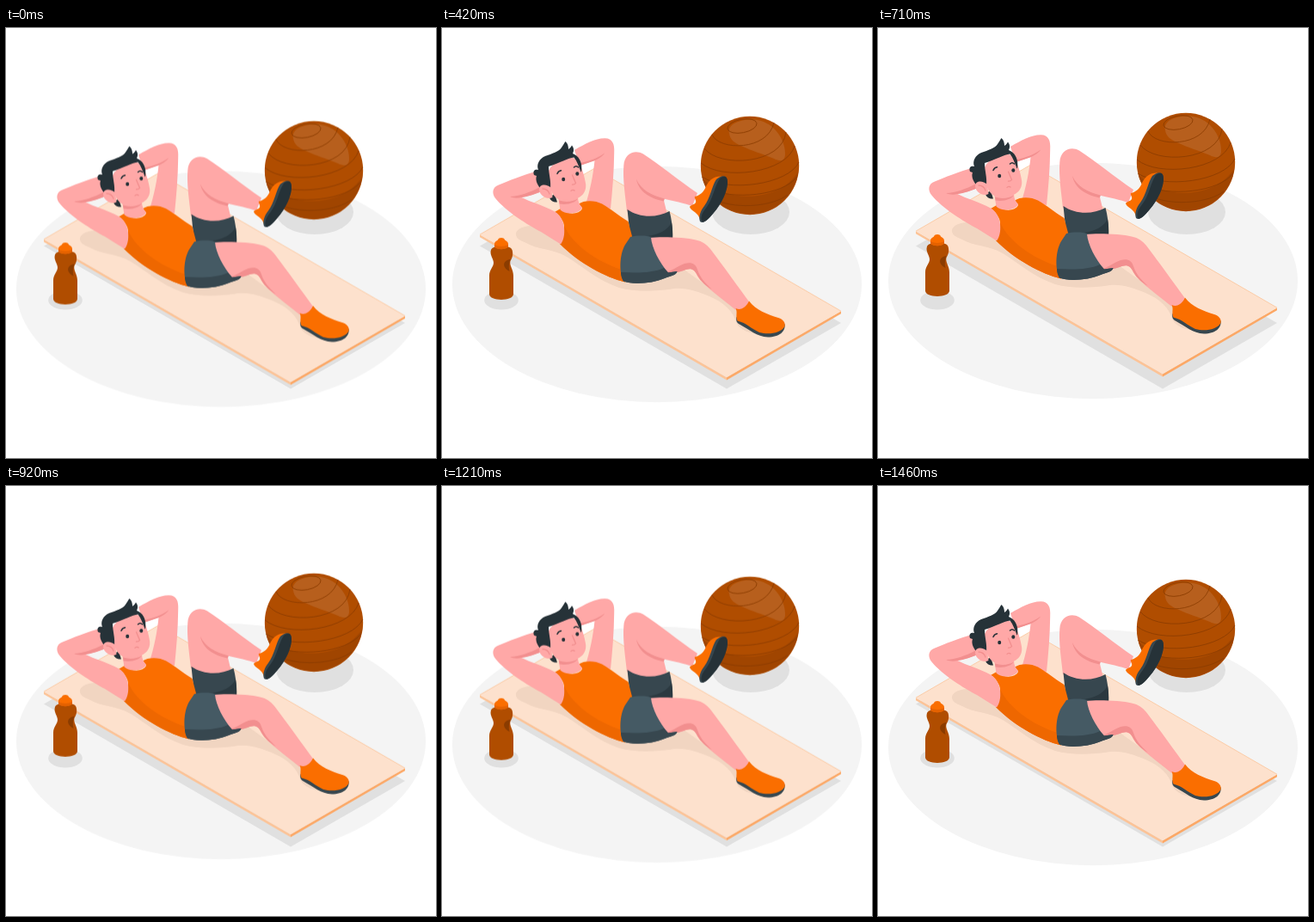
Write an HTML page that moves like this. It is 500x500 px and loops after 1.5 s.

```html
<!DOCTYPE html>
<html lang="en">
<head>
<meta charset="utf-8">
<title>Workout</title>
<style>
  html, body { margin: 0; width: 100%; height: 100%; overflow: hidden; background: #fff; }
  svg { display: block; width: 100%; height: 100%; }
  .skin { fill: #ffa8a7; }
  .blush { fill: #f28f8f; }
  .hair { fill: #263238; }
  .slate { fill: #455a64; }
  .deep { fill: #37474f; }
  .orange { fill: #fa6e00; }
  .rust { fill: #b04d00; }
  .shade { fill: #e0e0e0; }
  .seam { fill: none; stroke: #8a3c00; stroke-width: .8; }
  .line { fill: none; stroke: #f28f8f; stroke-width: 1.3; stroke-linecap: round; }
  .brow { fill: none; stroke: #263238; stroke-width: 1.5; stroke-linecap: round; }
</style>
</head>
<body>
<svg viewBox="0 0 500 500">
  <g class="float"><ellipse cx="250" cy="304" rx="238" ry="137.2" fill="#f4f4f4"/></g>

  <g class="shade">
    <path d="M44 253.500L331 419.500L464 343L177 177Z"/>
    <ellipse cx="359" cy="214" rx="45" ry="26"/>
    <ellipse cx="69" cy="316.500" rx="19.800" ry="11"/>
  </g>

  <g class="float">
    <!-- mat -->
    <path d="M44 246.200L331 412.200V415.400L44 249.200Z" fill="#fcc397"/>
    <path d="M331 412.200L464 335.200V338.200L331 415.400Z" fill="#fca866"/>
    <path d="M44 246.200L177 169.400L464 335.200L331 412.200Z" fill="#fde1cd"/>
    <path d="M44 246.200L177 169.400L464 335.200" fill="none" stroke="#fcc397" stroke-width=".8"/>
    <path d="M86 246C86 237 103 234 122 236L215 255L280 286C300 300 325 318 343 332L370 362C358 361 348 358 343 350C339 336 328 325 312 318.500C296 312 285 308 270 309C247 312.500 224 313 206 308C180 299 163 283 145 272C128 262 111 264 98 256C90 253 86 250 86 246Z" fill="#f1d5c1"/>

    <!-- ball -->
    <g>
      <circle class="rust" cx="358" cy="166" r="57.200"/>
      <path d="M302.500 180C330 213 395 207 414.500 173A57.200 57.200 0 0 1 302.500 180Z" fill="#a04500"/>
      <path d="M334 129C331 117 349 111 367 113C388 117 400 138 399 154C398 162 392 161 386 158C372 152 360 149 350 144C340 140 335 136 334 129Z" fill="#b75f1d"/>
      <g class="seam">
        <ellipse cx="349" cy="120" rx="17.300" ry="7.800" transform="rotate(-11 349 120)"/>
        <path d="M314 130C322 149 379 149 386 116"/>
        <path d="M305 146C322 169 396 165 400 127"/>
        <path d="M301 163C326 184 401 175 410 143"/>
        <path d="M302 179C332 198 403 188 415 162"/>
        <path d="M307 192C338 207 396 201 413 179"/>
        <path d="M320 207C346 217 385 213 402 200"/>
      </g>
    </g>

    <!-- bottle -->
    <g>
      <path class="rust" d="M57 264C59 258 80 258 81.500 264C83 269 82 273 79.500 277C78 282 83 287 83 294V315.500C83 324 55 324 55 315.500V294C55 287 60 284 60 279C60 274 55 270 57 264Z"/>
      <path d="M79.500 275C71 276 69 284 78.500 289C77 284 78 280 79.500 275Z" fill="#8a3c00"/>
      <path class="orange" d="M61 257.500C61 254.500 63 254 65 252.500C66 249.300 72 249.300 73 252.500C75 254 77 254.500 77 257.500V260.500C74 264 64 264 61 260.500Z"/>
      <path d="M61 258C65 260.500 73 260.500 77 258V260.500C74 264 64 264 61 260.500Z" fill="#e56200"/>
    </g>

    <!-- far arm -->
    <path class="skin" d="M154 148C166 141 178 134.500 189 134.300C198 134 201 141 200.200 151C200 174 198 196 196 216L167 211C172 196 176 176 177.500 160L160 166Z"/>
    <path class="blush" d="M161 163C172 160.500 182 157 189 151.500C187 155.500 181 158.700 177.500 160.200L160.500 166Z"/>

    <!-- raised leg -->
    <path class="skin" d="M215 219C213 200 210 182 211.300 166C212 152 224 147 234 152.500C252 164 276 184 297 198L291 213C283 210 268 207 257.500 204.500C259 211 261 218 262 225C250 231 228 228 215 219Z"/>
    <path class="blush" d="M226 182C231 194 244 201 259 204.500L257.800 207.500C242 204 229 197 226 182Z"/>
    <path class="orange" d="M288 214C290 211 293 212 295 209C296 206 293 204 294 202C300 201 305 196 307 190C311 182 317 178 325 178.500L303 231C299 230 300 226 297 223C294 219 289 218 288 214Z"/>
    <path class="deep" d="M319 182C326 176 332 177 332 186C331 200 322 215 312 225.500C308 230 303 234 300 231C298 225 301 218 305 213C312 204 314 189 319 182Z"/>
    <path class="hair" d="M323 181C329 177 332.300 178 332 187C331 200 322 215 312 225.500C308 230 304 233 302 230.500C300 225 304 219 308 214C315 205 317 190 323 181Z"/>
    <path class="deep" d="M215.500 217C229 226.500 249 227.500 264.500 219C267 228 268.500 240 268 251H219Z"/>
    <path d="M267 232C263 241 252 246 240 248L262 252L268.200 251C268.500 244 268 238 267 232Z" fill="#2b3940"/>

    <!-- torso -->
    <path class="orange" d="M131 220L138 216C145 224 160 223 163 216C162 213 160 212 159 210.500C165 206 178 206 186 210.500C196 216 206 225 216.500 231L222 252L213 301.500C190 296 160 280 137 257C142 250 144 236 140 230C137 224 134 222 131 220Z"/>
    <path d="M142.500 237C152 258 180 278 209 287L213 301.500C190 296 160 280 137 257C141 251 142.500 244 142.500 237Z" fill="#ee6700"/>

    <!-- near leg -->
    <path class="skin" d="M242 250C255 248.500 283 249.500 295 252.500C303 254 308 258 312 263C328 284 345 308 357.500 325C354 331 347 335 341 333.500C325 320 305 307 297 294C293 285 288 285 281 288C275 290 266 292 261 292C250 283 238 262 242 250Z"/>
    <path class="blush" d="M259 291C268 288 272 284 282 280C290 278 295 280 297 287C300 296 305 302 314 310C307 306 301 301 297 294C293 285 288 285 281 288C275 290 266 292 259 291Z"/>
    <path class="slate" d="M219 249C228 247 238 247 243 249.500C244 262 253 279 263 290.500L273.500 289C272 294 266 294 259 297C245 303 222 305 211 300.500C206 291 206 270 213 258Z"/>
    <path class="deep" d="M208 290C226 291 246 291 258 285L263 290.500L273.500 289C272 294 266 294 259 297C245 303 222 305 211 300.500C209 297 208 294 208 290Z"/>
    <path class="deep" d="M342.500 342C352 346 360 355 369 358C380 361 394 358 398.500 350C400 359 392 365.500 379 365.500C366 365 358 357 345 350C342 348 342 345 342.500 342Z"/>
    <path class="orange" d="M341.500 332C348 335 354 330 357 323.500C365 334 378 339 391 343C397 345 399.500 349 398.500 353C394 361 380 363 369 360C360 356 354 349 343.500 346.500C341 341 344 337 341.500 332Z"/>

    <!-- near arm -->
    <path class="skin" d="M112 172C94 177 77 184 66 188.500C58 191 58 199 62 204C75 220 100 235 115 243C123 248 131 253 138 257.500C145 249 144 227 131 219.500C117 212 102 208 92.500 203C102 201 112 198 118 195L114 176Z"/>
    <path class="blush" d="M79 202C90 201.500 103 197 113 191.500L117 195.500C109 199 100 202 92.500 203C88 204 83 204 79 202Z"/>

    <!-- head -->
    <path class="skin" d="M135 202L137.500 217.500C144 224 160 222 163 215C160 212 158 208 158 203Z"/>
    <path class="blush" d="M136 206.500C144 209 152 208 158 204.500C155 209 147 212 136.700 210.500Z"/>
    <path class="hair" d="M125 203L131 199L134 208.500C130 209 126 207 125 203Z"/>
    <path class="skin" d="M124 172C128 162 148 153 158 159C162 166 166 179 167.200 188C168 197 162 203 155 205C147 207.500 138 208 132 203C125 196 122 182 124 172Z"/>
    <path class="hair" d="M107 177C105 171 109 170 112 171C109.500 165 113 158 120 155C128 152 136 150 139 145C141 142 142 140 143.500 138C146 140 147 143 147 147C149 146 150 144 151 142.500C153 145 154 148 152 152C159 155 162.500 161 162.300 169C162.500 173 161.500 175 161 172C159 167 157 161 153.500 156.500C147 157 137 163 124 167C124 176 127 183 126 193L114 192C110 187 108.500 182 110 178Z"/>
    <path class="skin" d="M127 192C122 187 113 187 113 194C113.500 201 122 206 128.500 203Z"/>
    <path class="line" d="M117 193C121 193 124 196 125 199"/>
    <ellipse class="hair" cx="141.200" cy="182" rx="2" ry="2.300"/>
    <ellipse class="hair" cx="157.300" cy="175.500" rx="2" ry="2.300"/>
    <path class="brow" d="M134 175.500C135 173 137 172 138.500 171.800M153.500 168C155 166.500 157 166.500 158.500 168"/>
    <path class="line" d="M151.500 177L155.500 186.500C154.500 188 153 188.300 151.500 188.200M150 195.500C151 194 153 194 154 195"/>
  </g>
</svg>
<script>
  const LOOP = 1500, LEAD = 46, RISE = 10;
  const hold = 'steps(18, end)';
  const bob = [0, -RISE, 0].map(y => ({ transform: `translateY(${y}px)`, easing: hold }));
  for (const part of document.querySelectorAll('.float')) {
    part.animate(bob, { duration: LOOP, iterations: Infinity, delay: -LEAD });
  }
</script>
</body>
</html>
```
